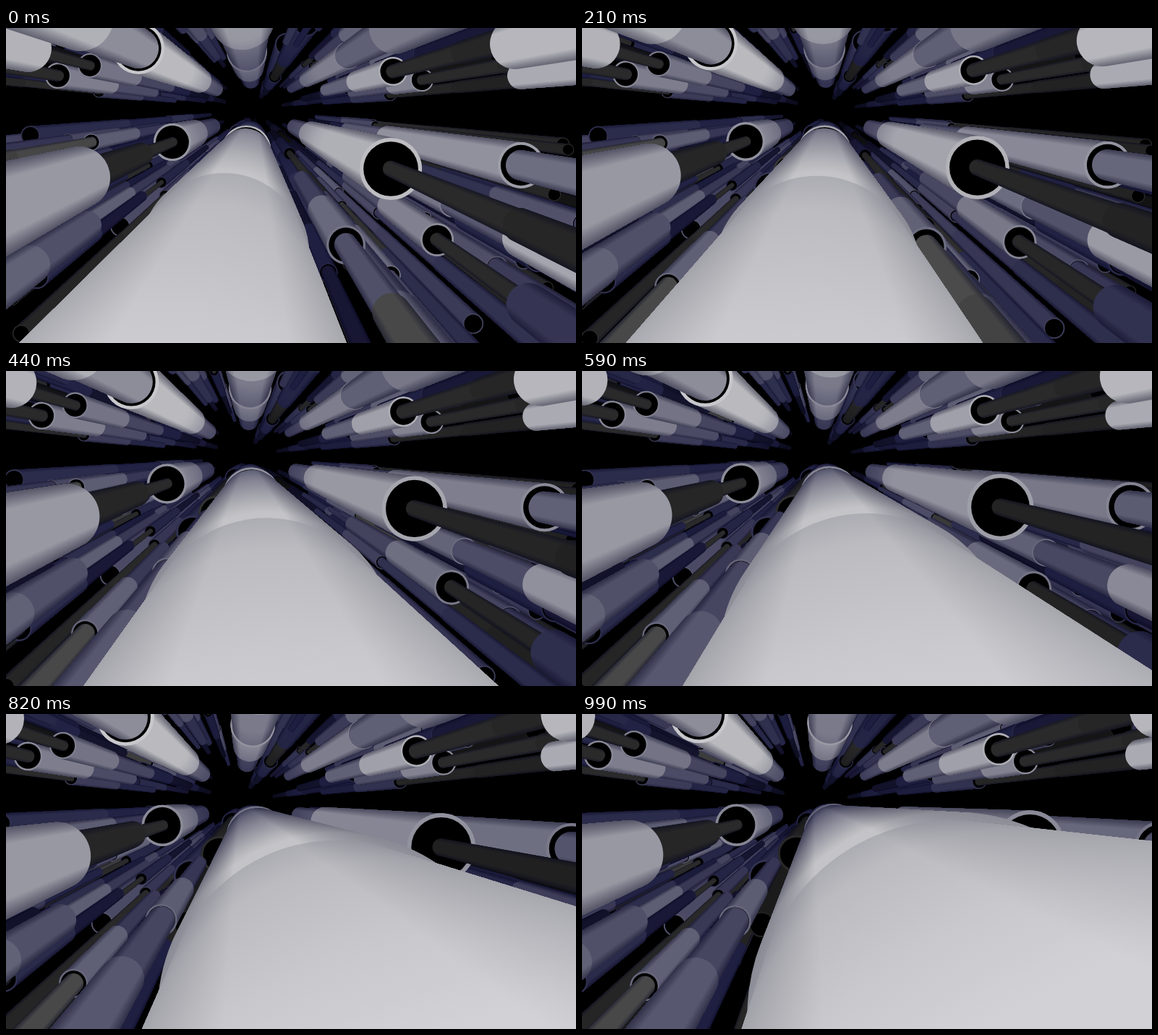
Animation of 788 by 436 pixels, one loop 1.07 s. Source, as an HTML page with a canvas:

```html
<!DOCTYPE html>
<html lang="en">
<head>
<meta charset="utf-8">
<title>Pipes</title>
<style>
html, body { margin: 0; width: 100%; height: 100%; overflow: hidden; background: #000; }
canvas { display: block; width: 788px; height: 436px; }
</style>
</head>
<body>
<canvas id="stage" width="788" height="436"></canvas>
<script>
const ctx = document.getElementById('stage').getContext('2d');
const LOOP = 1070, LAST = 13;
const STEPS = [0, 70, 140, 210, 290, 370, 440, 520, 590, 670, 750, 820, 910, 990];
const TAU = Math.PI * 2;
const mix = (a, b, u) => a + (b - a) * u;
const clamp = (v, lo, hi) => Math.max(lo, Math.min(hi, v));
const rad = deg => deg * Math.PI / 180;

// Dark metal turns navy, bright metal almost neutral.
function metal(tone, plain) {
  const v = Math.round(tone);
  const blue = plain ? 1 : 4 + 36 * clamp(1 - v / 190, 0, 1) * Math.min(1, v / 30);
  return `rgb(${v},${v},${Math.round(v + blue)})`;
}

function disc(c, scale, fill) {
  ctx.beginPath();
  ctx.arc(c.x, c.y, c.r * scale, 0, TAU);
  ctx.fillStyle = fill;
  ctx.fill();
}

// All circles are relative to the vanishing point, which is the canvas origin.
const along = (c, s, size = 1) => ({ x: c.x * s, y: c.y * s, r: c.r * s * size });

function outline(far, near) {
  const path = new Path2D();
  const dx = near.x - far.x, dy = near.y - far.y, d = Math.hypot(dx, dy);
  if (d <= Math.abs(near.r - far.r)) {
    path.arc(near.x, near.y, near.r, 0, TAU);
  } else {
    const a = Math.atan2(dy, dx), b = Math.acos((far.r - near.r) / d);
    path.arc(far.x, far.y, far.r, a + b, a + TAU - b);
    path.arc(near.x, near.y, near.r, a - b, a + b);
    path.closePath();
  }
  return path;
}

// Sides of a pipe sink into blue shadow.
function sideShade(c, depth) {
  const half = Math.asin(Math.min(1, c.r / Math.hypot(c.x, c.y))) / TAU;
  const shade = ctx.createConicGradient(Math.atan2(c.y, c.x) - Math.PI, 0, 0);
  const edge = `rgba(0,0,26,${depth})`, clear = 'rgba(0,0,26,0)';
  shade.addColorStop(0.5 - half, edge);
  shade.addColorStop(0.5 - half * 0.6, clear);
  shade.addColorStop(0.5 + half * 0.6, clear);
  shade.addColorStop(0.5 + half, edge);
  return shade;
}

// toneAt gives the brightness from the far end (0) to the near end (1).
function pipe(c, from, to, size, toneAt, plain, depth = 0.45) {
  const far = along(c, from, size), near = along(c, to, size);
  const length = ctx.createRadialGradient(far.x, far.y, far.r, near.x, near.y, near.r);
  for (let i = 0; i <= 8; i++) length.addColorStop(i / 8, metal(toneAt(i / 8), plain));
  const path = outline(far, near);
  ctx.fillStyle = length;
  ctx.fill(path);
  ctx.fillStyle = sideShade(near, depth);
  ctx.fill(path);
  return near;
}

// Parts run from far to near: { end, size, tone }.
function drawChain(c, start, parts) {
  const reach = Math.hypot(c.x, c.y);
  let from = start;
  for (const { end, size, tone } of parts) {
    const plain = size < 0.7 && tone < 75;
    const lit = s => tone * Math.min(1, 0.25 + s * Math.max(0, reach - c.r * size) / 130);
    const near = pipe(c, from, end, size, t => lit(mix(from, end, t)), plain);
    disc(near, 1, metal(Math.min(205, lit(end) * 1.06 + 4), plain));
    disc(near, 0.88, '#000');
    from = end;
  }
}

// An open pipe: narrow neck, body, inner rod, thicker length nearest the eye.
function open(x, y, r, tone, rod, { neck = 0.74, joint = 1.5, next = rod * 1.1 } = {}) {
  const inner = rod < 0.5 ? 42 : tone * 0.76;
  return { x, y, r, start: neck * 0.7, parts: [
    { end: neck, size: 0.84, tone: tone * 0.6 },
    { end: 1, size: 1, tone },
    { end: joint, size: rod, tone: inner },
    { end: 2.6, size: next, tone: inner * (next > 0.8 ? 1.25 : 0.9) }
  ] };
}

// A solid length whose near end lies off the stage.
const solid = (x, y, r, tone) => ({ x, y, r, start: 1, parts: [{ end: 2.5, size: 1, tone }] });

let seed = 23;
const random = () => (seed = seed * 16807 % 2147483647) / 2147483647;

function distantPipe() {
  const z = 2 + 6.5 * random();
  const side = random() < 0.4 ? -1 : 1;
  const x = (random() - 0.5) * 2800 / z, y = side * (95 + 750 * random()) / z;
  return open(x, y, 42 / z, 28 + 75 * random() ** 1.5, 0.4 + 0.5 * random());
}

const scene = [
  ...Array.from({ length: 180 }, distantPipe).sort((a, b) => a.r - b.r),
  // above, left
  open(-272, -47, 18, 125, 0.45),
  open(-228, -61, 17, 115, 0.4),
  solid(-314, -85, 33, 178),
  open(-161, -85, 36, 185, 0.78, { neck: 0.48 }),
  // above, right
  open(231, -41, 16, 130, 0.45, { neck: 0.84 }),
  solid(368, -47, 19, 170),
  open(191, -53, 20, 160, 0.48),
  solid(360, -91, 35, 182),
  open(129, -75, 19, 125, 0.96, { neck: 0.56, next: 1.25 }),
  open(-11, -80, 28, 160, 0.92, { joint: 1.6 }),
  // below, left
  open(-226, 45, 12, 92, 0.62),
  solid(-232, 160, 20, 80),
  solid(-310, 215, 27, 98),
  open(-112, 160, 20, 92, 0.86),
  open(-114, 45, 26, 140, 0.27, { joint: 1.38, next: 0.46 }),
  solid(-243, 94, 43, 152),
  // below, right
  open(273, 131, 18, 115, 0.9),
  solid(370, 178, 28, 165),
  open(126, 187, 27, 105, 0.6),
  open(252, 180, 23, 128, 0.42, { next: 0.88 }),
  open(368, 77, 32, 145, 0.66, { neck: 0.5 }),
  open(188, 82, 43, 175, 0.26, { neck: 0.42, joint: 1.95 })
];

// The eye moves forward, left and down while turning right.
function move({ x, y, r }, u) {
  const e = x > 60 ? u * (0.72 + 0.28 * u) : u;
  const grow = 1 + 0.12 * e;
  return {
    x: x * grow + r * e * (1.25 + clamp(x / 240, -0.9, 0.8)),
    y: y * grow - 0.8 * r * e,
    r: r * grow
  };
}

// The light leaves the lower right side.
const dim = ({ x, y }, u) => x > 0 && y > 0 ? 1 - 0.28 * u : 1;

function drawFront(k) {
  const u = k / LAST;
  const half = rad(35 + 1.45 * k), axis = rad(101.9 - 2.6 * k - 0.065 * k * k);
  const side = 168 + 3 * k, d = side / Math.cos(half);
  const c = { x: d * Math.cos(axis), y: d * Math.sin(axis), r: side * Math.tan(half) };
  const mouth = mix(0.28, 0.14, u);
  const rim = pipe(c, mouth * 0.7, mouth, 1.04, t => 20 + 40 * t);
  disc(rim, 1, metal(mix(185, 100, u)));
  disc(rim, 0.93, '#000');
  const dark = mix(120, 60, u);
  pipe(c, mouth * 1.12, 1, 1, t => mix(dark, 196, t ** 0.7), false, 0.3);
  pipe(c, 1, 5, 0.96, t => mix(172, 210, t ** 0.45), false, 0.14);
}

function draw(k) {
  const u = k / LAST;
  ctx.setTransform(1, 0, 0, 1, 0, 0);
  ctx.fillStyle = '#000';
  ctx.fillRect(0, 0, 788, 436);
  ctx.translate(344 - 1.75 * k, 113 + 0.85 * k);
  for (const p of scene) {
    const light = dim(p, u);
    drawChain(move(p, u), p.start, p.parts.map(part => ({ ...part, tone: part.tone * light })));
  }
  drawFront(k);
}

let shown = -1;
function tick() {
  const t = performance.now() % LOOP;
  const k = STEPS.findLastIndex(at => at <= t);
  if (k !== shown) draw(shown = k);
  requestAnimationFrame(tick);
}
tick();
</script>
</body>
</html>
```
